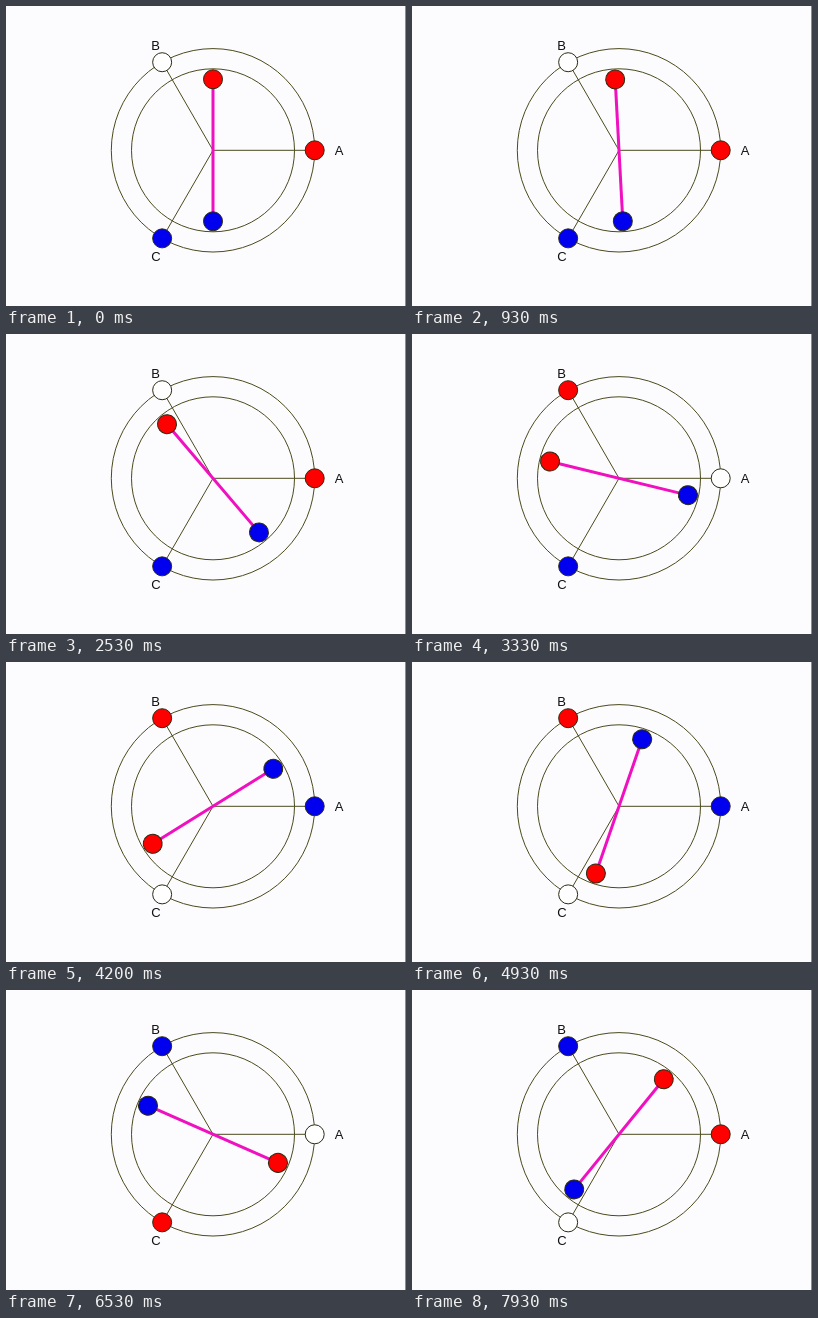
Animation, 400 px wide and 300 px high, one loop 8000 ms. Source, as an HTML page:

```html
<!DOCTYPE html>
<html lang="en">
<head>
<meta charset="utf-8">
<title>Three-phase motor</title>
<style>
  html, body { margin: 0; width: 100%; height: 100%; overflow: hidden; background: #fcfcfe; }
  svg { display: block; width: 400px; height: 300px; }
  .thin { fill: none; stroke: #4c4a1c; stroke-width: 1; }
  .ball { stroke: #2c2a10; stroke-width: 1; }
  text { font: 13px "Liberation Sans", Arial, sans-serif; fill: #111; text-anchor: middle; }
</style>
</head>
<body>
<svg viewBox="0 0 400 300">
  <rect width="400" height="300" fill="#fcfcfe"/>
  <path d="M399.5 0V300" stroke="#8c8c90"/>
  <g id="stator" transform="translate(207 144.3)">
    <circle class="thin" r="101.7"/>
    <circle class="thin" r="81.5"/>
  </g>
  <g id="rotor">
    <path d="M-71 0H71" stroke="#f010c0" stroke-width="3"/>
    <circle class="ball" cx="71" r="9.5" fill="#f00"/>
    <circle class="ball" cx="-71" r="9.5" fill="#00e"/>
  </g>
  <text x="333" y="149">A</text>
  <text x="149.7" y="44">B</text>
  <text x="150" y="255">C</text>
</svg>
<script>
const LOOP = 8000, STEP = 1000 / 15;
const SPEED = 0.0533;   // degrees per ms once up to speed
const RAMP = 3826;      // ms from rest to full speed
const COLORS = { r: '#f00', b: '#00e', w: '#fff' };
// Coil colours for A, B, C; one entry per 60 degrees of rotor travel.
const PHASES = ['rwb', 'wrb', 'brw', 'bwr', 'wbr', 'rbw'];

const stator = document.getElementById('stator');
const rotor = document.getElementById('rotor');

function add(tag, attrs) {
  const el = document.createElementNS('http://www.w3.org/2000/svg', tag);
  for (const name in attrs) el.setAttribute(name, attrs[name]);
  return stator.appendChild(el);
}

const coils = [0, 120, 240].map(deg => {
  const a = deg * Math.PI / 180;
  const x = 101.7 * Math.cos(a), y = -101.7 * Math.sin(a);
  add('path', { class: 'thin', d: `M0 0L${x} ${y}` });
  return add('circle', { class: 'ball', cx: x, cy: y, r: 9.5 });
});

// Smooth run-up from rest, then constant speed.
function travel(t) {
  if (t >= RAMP) return SPEED * (t - RAMP / 2);
  const u = t / RAMP;
  return SPEED * RAMP * (u ** 3 - u ** 4 / 2) + Math.sin(Math.PI * u) ** 2;
}

function draw(now) {
  const t = Math.floor((now % LOOP + 4) / STEP) * STEP % LOOP;
  const turn = travel(t);
  const phase = PHASES[Math.floor(turn / 60) % 6];
  coils.forEach((coil, i) => coil.setAttribute('fill', COLORS[phase[i]]));
  rotor.setAttribute('transform', `translate(207 144.3) rotate(${-90 - turn})`);
}

const start = performance.now();
function tick() {
  draw(performance.now() - start);
  requestAnimationFrame(tick);
}
tick();
</script>
</body>
</html>
```
